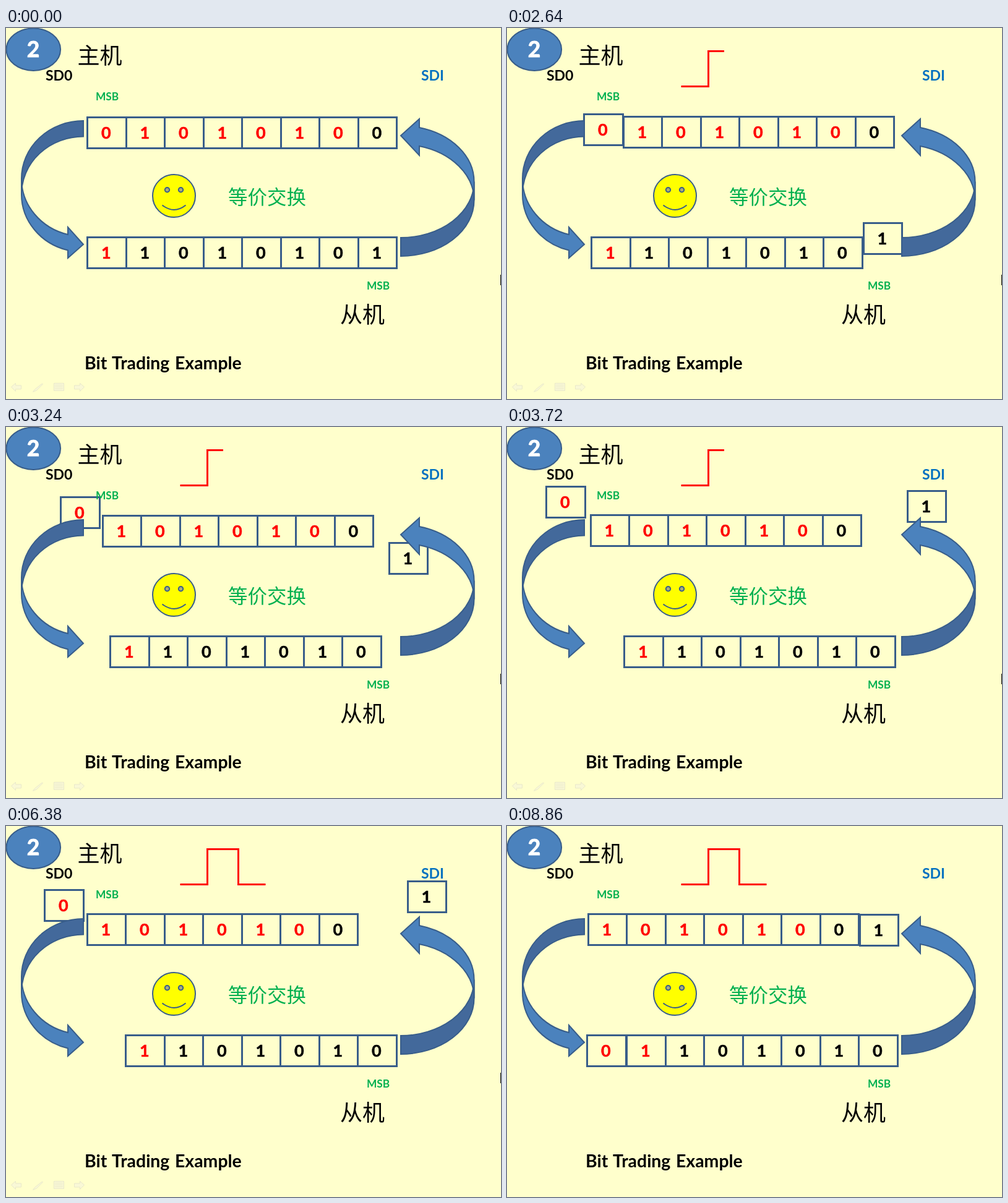
Animation of 800x600 px, one loop 9.32 s. Source, as an HTML page:

```html
<!DOCTYPE html>
<html lang="zh">
<head>
<meta charset="utf-8">
<title>Bit Trading Example</title>
<style>
  html, body { margin: 0; width: 100%; height: 100%; overflow: hidden; background: #ffffcc; }
  svg { display: block; width: 100vw; height: 100vh; }
  text { font-family: Lato, Carlito, sans-serif; font-weight: 700; }
  .cjk { font-family: "Noto Sans CJK SC", "Noto Sans CJK", sans-serif; font-weight: 300; }
  .digit { font-size: 27px; text-anchor: middle; stroke-width: .5; }
  .outline { stroke: #385d8a; stroke-width: 2; stroke-linejoin: miter; }
  .cell { fill: none; stroke: #385d8a; stroke-width: 3; shape-rendering: crispEdges; }
  .pulse { fill: none; stroke: #f00; stroke-width: 3; }
  .small { font-size: 17.3px; fill: #00b050; }
  .label { font-size: 23px; }
</style>
</head>
<body>
<svg viewBox="0 0 800 600" id="stage">
  <defs>
    <clipPath id="riseClip"><rect id="riseWipe" x="281" y="30" width="0" height="72"/></clipPath>
    <clipPath id="fallClip"><rect id="fallWipe" x="349" y="30" width="0" height="72"/></clipPath>
  </defs>
  <rect width="800" height="600" fill="#ffffcc"/>
  <g id="cells"></g>
  <g id="arrows"></g>

  <ellipse class="outline" cx="44.3" cy="34.7" rx="43.8" ry="34.2" fill="#4b82bd"/>
  <text x="44" y="47" font-size="35.5" fill="#fff" stroke="#fff" stroke-width=".9" text-anchor="middle">2</text>
  <text class="cjk" x="115.5" y="57.7" font-size="36">主机</text>
  <text class="cjk" x="540" y="476.7" font-size="36">从机</text>
  <text class="cjk" x="359" y="284.5" font-size="31.5" fill="#00b050">等价交换</text>
  <text class="label" x="64" y="85">SD0</text>
  <text class="label" x="671" y="85" fill="#0070c0">SDI</text>
  <text class="small" x="145" y="117">MSB</text>
  <text class="small" x="583" y="423">MSB</text>
  <text x="127" y="552" font-size="28.4" word-spacing="1.8">Bit Trading Example</text>

  <g class="outline">
    <circle cx="271.5" cy="271.5" r="34.5" fill="#ff0"/>
    <circle cx="260.5" cy="261.7" r="3.7" fill="#a8ab7c"/>
    <circle cx="282.5" cy="261.7" r="3.7" fill="#a8ab7c"/>
    <path d="M252.5 286.5Q271.5 301.5 290.5 286.5" fill="none"/>
  </g>

  <path class="pulse" clip-path="url(#riseClip)" d="M281.5 94.5H325.5V37.5H351"/>
  <path class="pulse" clip-path="url(#fallClip)" d="M349 37.5H375.5V94.5H419.5"/>

  <g id="controls" fill="#f9f8d6" stroke="#e9e8c9">
    <path d="M8.5 580.5l7-6v3.5h9v6h-9v3.5z"/>
    <path d="M43.5 588.5l3-4 12-9.5 1 1-10 10z"/>
    <path d="M77.5 574.5h16v12h-16zM79 577.5h13M79 580.5h13M79 583.5h13"/>
    <path d="M126.5 580.5l-7-6v3.5h-9v6h9v3.5z"/>
  </g>
  <rect id="edgeMark" x="799" y="399" width="1" height="17"/>
</svg>
<script>
const LOOP = 9320, STEP = 60, PITCH = 62.5, LEFT = 131.5, HEIGHT = 50;
const byId = id => document.getElementById(id);

function add(parent, tag, attrs, text = '') {
  const node = document.createElementNS('http://www.w3.org/2000/svg', tag);
  for (const key in attrs) node.setAttribute(key, attrs[key]);
  node.textContent = text;
  parent.appendChild(node);
  return node;
}

// Cells from..to of a register; the first `redCount` bits are red.
function addCells(bits, top, redCount, from, to) {
  const group = add(byId('cells'), 'g', {});
  for (let i = from; i < to; i++) {
    const x = LEFT + i * PITCH;
    const color = i < redCount ? '#f00' : '#000';
    add(group, 'rect', { class: 'cell', x, y: top, width: PITCH, height: HEIGHT });
    add(group, 'text', {
      class: 'digit', x: x + PITCH / 2 - 1, y: top + HEIGHT / 2 + 9.5,
      fill: color, stroke: color
    }, bits[i]);
  }
  return group;
}

// Curved ribbon arrow: starts at the origin, bends left and returns lower down.
function addArrow(transform, a) {
  const { rx, ry, thick, head, baseTop, baseBottom, tip } = a;
  const group = add(byId('arrows'), 'g', { class: 'outline', transform });
  const neck = ry + ry * Math.sqrt(1 - (head / rx) ** 2);
  const arc = (sweep, x, y) => `A${rx} ${ry} 0 0 ${sweep} ${x} ${y}`;
  add(group, 'path', {
    fill: '#43699b',
    d: `M0 0${arc(0, -rx, ry)}V${ry + thick}${arc(1, 0, thick)}Z`
  });
  add(group, 'path', {
    fill: '#4b82bd',
    d: `M${-rx} ${ry}${arc(0, -head, neck)}V${baseTop}L0 ${tip}L${-head} ${baseBottom}` +
       `V${neck + thick}${arc(1, -rx, ry + thick)}Z`
  });
}

const master = '01010100', slave = '11010101';
const masterOut = addCells(master, 144.5, 7, 0, 1);
const masterRest = addCells(master, 144.5, 7, 1, 8);
const slaveRest = addCells(slave, 338.5, 1, 0, 7);
const slaveOut = addCells(slave, 338.5, 1, 7, 8);

addArrow('translate(125 150)',
  { rx: 100, ry: 93.5, thick: 25.5, head: 25, baseTop: 172, baseBottom: 222, tip: 200 });
addArrow('translate(638 369) rotate(180)',
  { rx: 118.5, ry: 90.5, thick: 30, head: 30, baseTop: 163, baseBottom: 222, tip: 195 });

// Progress held for one step at a time.
function progress(t, first, lead, duration) {
  if (t < first) return 0;
  const elapsed = Math.floor((t - first) / STEP) * STEP + lead;
  return Math.min(1, elapsed / duration);
}
const ease = u => u < .5 ? 2 * u * u : 1 - 2 * (1 - u) ** 2;
const within = (t, ...spans) => spans.some(([a, b]) => t >= a && t < b);
const show = (id, on) => byId(id).setAttribute('visibility', on ? 'visible' : 'hidden');

// Moving parts snap down to whole pixels.
function move(node, p, out, q = 0, back = [0, 0]) {
  const [x, y] = [0, 1].map(i => Math.floor(out[i] * p + back[i] * q));
  node.setAttribute('transform', `translate(${x} ${y})`);
}

function draw(t) {
  const p = ease(progress(t, 2280, 18, 1770));
  const q = ease(progress(t, 6200, 80, 1800));
  move(masterOut, p, [-71.5, -51], q, [70, 245]);
  move(slaveOut, p, [83.5, -250.5], q, [-82, 55.5]);
  move(masterRest, p, [-62.8, -1.6]);
  move(slaveRest, p, [62, 0]);
  byId('riseWipe').setAttribute('width', 71 * progress(t, 1000, 30, 450));
  byId('fallWipe').setAttribute('width', 72 * progress(t, 4860, 30, 450));
  show('controls', within(t, [0, 1420], [2150, 4140], [4800, 5340], [6000, 8000]));
  show('edgeMark', t < 8860);
}

const start = performance.now();
function tick() {
  draw((performance.now() - start) % LOOP);
  requestAnimationFrame(tick);
}
tick();
</script>
</body>
</html>
```
